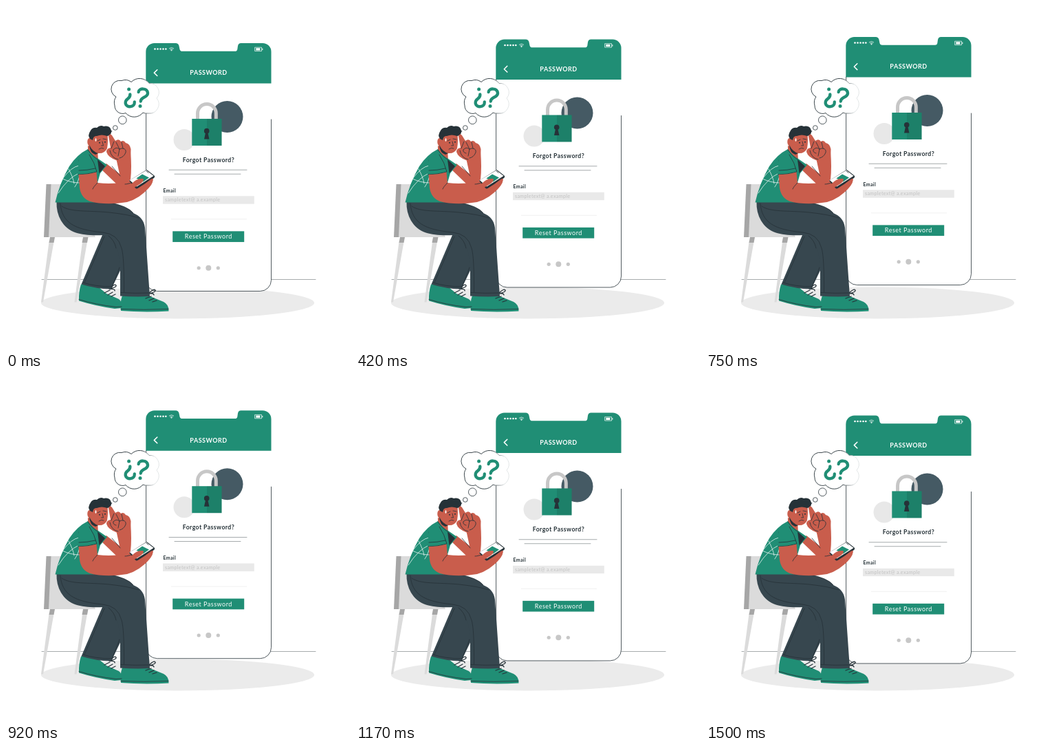
Write an HTML page that moves like this. It is 500 by 500 pixels and loops after 1.54 s.

```html
<!DOCTYPE html>
<html lang="en">
<head>
<meta charset="utf-8">
<title>Forgot password</title>
<style>
  html, body { margin: 0; width: 100%; height: 100%; overflow: hidden; background: #fff; }
  svg { display: block; width: 100%; height: 100%; }
  text { font-family: Lato, sans-serif; text-anchor: middle; }
  .green { fill: #208e75; }
  .dark { fill: #263238; }
  .skin { fill: #c95d4c; }
  .pants { fill: #37474f; }
  .white { fill: #fff; }
  .seat { fill: #dbdbdb; }
  .shade { fill: #a6a6a6; }
  .pale { fill: #ebebeb; }
  .line { fill: none; stroke: #263238; stroke-width: .8; stroke-linecap: round; stroke-linejoin: round; }
  .thin { stroke-width: .55; opacity: .75; }
  .light { fill: none; stroke: #fff; stroke-width: .7; stroke-linecap: round; }
  .mark { fill: none; stroke: #208e75; stroke-width: 4.4; stroke-linecap: round; }
</style>
</head>
<body>
<svg viewBox="0 0 500 500">
  <defs>
    <linearGradient id="fade" gradientUnits="userSpaceOnUse" x1="198" x2="216" y1="0" y2="0">
      <stop stop-color="#263238"/>
      <stop offset="1" stop-color="#dfe3e4"/>
    </linearGradient>
  </defs>

  <ellipse class="pale" cx="249.5" cy="431.5" rx="198.5" ry="23"/>
  <path class="line thin" d="M52 397.5H450"/>

  <g id="phone">
    <path class="white" d="M203.5 66a12 12 0 0 1 12-12H373.500a12 12 0 0 1 12 12V398.500a16 16 0 0 1-16 16H219.500a16 16 0 0 1-16-16Z"/>
    <path class="line" d="M203.600 112V398.500a16 16 0 0 0 16 16H369.500a16 16 0 0 0 16-16V165"/>
    <path class="green" d="M203.300 112.500V66.500a12.500 12.500 0 0 1 12.500-12.500H246.500Q250.500 54 251.500 58L252.500 63Q253.200 65.800 256 65.800H333Q335.800 65.800 336.300 63L337 58Q337.800 54 341.500 54H373a12.500 12.500 0 0 1 12.500 12.500V112.500Z"/>
    <g class="white">
      <circle cx="216.500" cy="62.500" r="1.300"/>
      <circle cx="220.500" cy="62.500" r="1.300"/>
      <circle cx="224.500" cy="62.500" r="1.300"/>
      <circle cx="228.500" cy="62.500" r="1.300"/>
      <circle cx="232.300" cy="62.500" r="1.300"/>
      <circle cx="240.500" cy="64.500" r=".9"/>
      <rect x="363.300" y="61.300" width="6" height="3.200"/>
      <rect x="372.300" y="61.700" width="1" height="2.400"/>
    </g>
    <path class="light" d="M237.300 61.700q3.200-2.600 6.400 0M238.700 63.200q1.800-1.500 3.600 0M362 60.200h9.500v5.400h-9.500z"/>
    <path class="light" stroke-linejoin="round" style="stroke-width:1.5" d="M219.800 92.800 215.300 97.200 219.800 101.600"/>
    <text class="white" x="294.500" y="100.300" font-size="9" font-weight="700" letter-spacing=".5">PASSWORD</text>

    <circle cx="259" cy="194.500" r="15.500" fill="#e8e8e8"/>
    <circle cx="321.500" cy="161" r="23" fill="#455a64"/>
    <path fill="none" stroke="#c7c7c7" stroke-width="5" d="M278.500 165V156a13.400 13.400 0 0 1 26.800 0V165"/>
    <rect class="green" x="270.300" y="164" width="43.200" height="39"/>
    <path opacity=".1" d="M292 164h21.500v39H292z"/>
    <circle class="dark" cx="291.700" cy="181.700" r="3.800"/>
    <path class="dark" d="M290.300 183h2.800l2.300 10.500h-7.400z"/>

    <text class="dark" x="294.400" y="226.700" font-size="8.700" font-weight="700" letter-spacing=".42">Forgot Password?</text>
    <path class="line thin" d="M237 238.300H350M245 244.300H341"/>
    <text class="dark" x="237.800" y="270.900" font-size="7" font-weight="700" letter-spacing=".3">Email</text>
    <rect x="228" y="276.300" width="132.800" height="11.400" fill="#e9e9e9"/>
    <text x="231" y="284.300" font-size="7.200" letter-spacing=".3" fill="#c2c2c2" style="text-anchor:start">sampletext@ a.example</text>
    <path d="M240 309.800H350" stroke="#ececec" stroke-width=".8"/>
    <rect class="green" x="242.200" y="327.400" width="104" height="15.700"/>
    <text class="white" x="294.300" y="338.400" font-size="9" letter-spacing=".5">Reset Password</text>
    <g fill="#c7c7c7">
      <circle cx="280.200" cy="380.800" r="2.600"/>
      <circle cx="294.300" cy="380.800" r="4"/>
      <circle cx="308.300" cy="380.800" r="2.600"/>
    </g>
  </g>

  <g id="thought">
    <path class="white" stroke="url(#fade)" stroke-width=".9" d="M160 132A12.500 12.500 0 0 1 168 108.500Q176 105.500 182 110.500A17 17 0 0 1 208 112.500A13 13 0 0 1 219 134A13.500 13.500 0 0 1 207 156Q202 156.500 199 155A16 16 0 0 1 174 155.500A11.500 11.500 0 0 1 158 145Q156 137 160 132Z"/>
    <ellipse class="white" cx="169.300" cy="165.800" rx="5.800" ry="5.900" stroke="#263238" stroke-width=".8"/>
    <circle class="white" cx="158.800" cy="177" r="3.300" stroke="#263238" stroke-width=".8"/>
    <circle class="dark" cx="153.500" cy="182" r=".8"/>
    <path class="mark" d="M180.300 128.500C181 136 172.500 134 173.700 141.500C175 148.500 187.500 147.500 186.800 139.500"/>
    <path class="mark" d="M192.700 125C193 119.200 205.500 118.500 206 126.500C206.300 133.500 196 131.500 195.800 138.500"/>
    <circle class="green" cx="178.600" cy="121" r="2.500"/>
    <circle class="green" cx="195" cy="145.600" r="2.500"/>
  </g>

  <g id="chair">
    <path class="seat" d="M64 259H105L130 336H61Z"/>
    <path class="shade" d="M58.500 259H65.500L62 336H55Z"/>
    <path class="seat" d="M62.500 343H69.500L54 430.500H51ZM111 343H118L102.500 430.500H99.500Z"/>
    <path class="shade" d="M64 336H71L69.500 344H62.500ZM112 336H119.500L118 344H110.500Z"/>
  </g>

  <g id="shoes">
    <path class="green" d="M109 404.500Q120 404 135 409L146 418L164 426Q169 429 168 439L158 440Q130 436 106 428.500Q105.500 415 109 404.500Z"/>
    <path class="green" d="M169 421H207L229 430Q237 434 236.500 443.500Q200 445.500 167 443Q165.500 430 169 421Z"/>
    <path class="line" d="M106 426.500Q130 434 160 437.500L168 437M167 440.500Q200 442 236 440.500"/>
    <path class="line" style="stroke-width:1.300" d="M143 417l8-4M148 420l7-4M153 422l6-3M150 411q8-8 10-5q1 3-10 5q9 0 8 3M203 425l8-3M208 428l7-3M213 430l6-2M207 418q8-8 10-5q1 3-10 5q8-1 8 2"/>
  </g>

  <g id="legs">
    <path class="pants" d="M140 333L109.500 404.500Q130 411 153 411.500L172 372L176 330Z"/>
    <path class="pants" d="M73.500 285H148Q178 291 185 301Q200 307 202 322L209 422Q188 423 166 421.500V374L160 342Q155 333 142 333C113 334 92 332 80 312Q73 300 73.500 285Z"/>
    <path class="line" d="M79 287C81 314 98 325 140 329Q163 331 168 352Q172 365 171.500 416M81 291C94 300 118 297 150 300Q178 303 193 308M149 334Q158 341 160 352M143 335L114 402M112 402Q130 408 155 408M167 416.500Q188 418 208 417M148 285Q178 291 185 301M165 380L153 411"/>
  </g>

  <g id="torso">
    <path class="skin" d="M119 203L133 207L134 226L119 213Z"/>
    <path class="skin" d="M137 236L146 229L165 244L160 221L181 213Q183 234 181 252Q174 262 160 258Z"/>
    <path class="green" d="M119 208Q126 218 134 222L147 231L137 243L133 257L128 285.500H71.500Q78 257 92 233Q103 216 119 208Z"/>
    <path class="dark" d="M133 223L144 233L135.500 243Z"/>
    <path class="light" d="M83 250Q95 234 106 232Q110 250 100 263M82 251Q94 257 107 257M76 272Q90 250 106 243M91 237Q98 250 99 258"/>
    <path class="line" d="M119 209Q125 218 133 223M106 224Q110 240 106 256"/>
  </g>

  <g id="head">
    <path class="skin" d="M124 186L147 183Q149 196 147 207Q143 215 134 214Q126 213 123 205Q117 202 118.500 195Q120 190 124 193Z"/>
    <path class="dark" d="M121 202Q126 212 134 214L130 216Q122 214 121 202Z"/>
    <path class="dark" d="M122 193Q118 188 123 181Q126 176 132 177Q137 172 142 175Q151 173 153 181Q154 188 147 189Q139 186 132 189Q127 188 126 195Z"/>
    <path class="line" d="M133 196l4-2M141 193l5 1M140 197l1.500 6h-3M135 208q4-3 7-1"/>
    <circle class="dark" cx="136" cy="198.700" r="1"/>
    <circle class="dark" cx="144" cy="197.800" r="1"/>
    <path class="white" d="M130.500 191.500q2 4 0 5.500q-2-1 0-5.500z"/>
  </g>

  <g id="hand">
    <path class="skin" d="M152 206L149 189Q151 184 154 188L159 196Q164 192 167 197Q171 194 174 199Q180 200 181.500 208L181 224L162 225Q148 220 146 212Q146 207 152 206Z"/>
    <path class="line" d="M153 207L157 197M156 209Q160 204 165 208L163 218M160 198L165 208M168 198L170 207Q175 208 174 213Q171 220 165 221M156 209Q155 213 160 214M165 208Q169 206 170 207M151 210Q153 221 163 223"/>
    <path class="line" d="M154 233Q162 242 166 247"/>
  </g>

  <g id="arm">
    <path class="green" d="M106 218Q118 212 125 222L132 241Q118 245 104 245Z"/>
    <path class="line" d="M121 216Q129 228 132 241Q118 245 105 245M106 239Q118 239 130 236"/>
    <path class="skin" d="M105.500 245Q119 245 131.500 241.500L133 257Q158 260 180 254L190 250Q198 248 207 252L212 250Q216 255 208 264Q194 280 176 285Q145 290 122 284Q109 279 107 264Z"/>
    <path class="line" d="M133 257Q127 263 126 266M187 255Q178 259 173 259"/>
  </g>

  <g id="handset">
    <path class="dark" d="M179 254L203.500 238.500Q205 238 206 239L215.500 246.500Q217 248 215 250L191.500 265Q189.500 266 188 264.500Z"/>
    <path class="white" d="M180 253.300L204 238.800L214.500 247L190 262.500Z"/>
    <path class="green" d="M189.500 250.500L198 244.500L208 249.500L199.500 255.500Z"/>
    <path class="skin" d="M183 258Q190 250 199 251Q202 253 196 258L188 263Q182 265 183 258ZM205 256Q212 248 214 252Q212 260 204 265L198 262Z"/>
    <path class="line" d="M215 249L190 264.500M204 240l3 2.500"/>
  </g>
</svg>
<script>
  const LOOP = 1540, PEAK = 1490, TRAVEL = 10, LOWEST = 0.6;
  const phone = document.getElementById("phone");

  // Triangle wave: steady drift up, then steady drift down.
  function offsetAt(ms) {
    const phase = ((ms - PEAK + LOOP) % LOOP) / LOOP;
    return LOWEST - TRAVEL * (1 - Math.abs(1 - 2 * phase));
  }

  const start = performance.now();
  function draw() {
    const y = offsetAt((performance.now() - start) % LOOP);
    phone.setAttribute("transform", `translate(0 ${y.toFixed(2)})`);
    requestAnimationFrame(draw);
  }
  draw();
</script>
</body>
</html>
```
